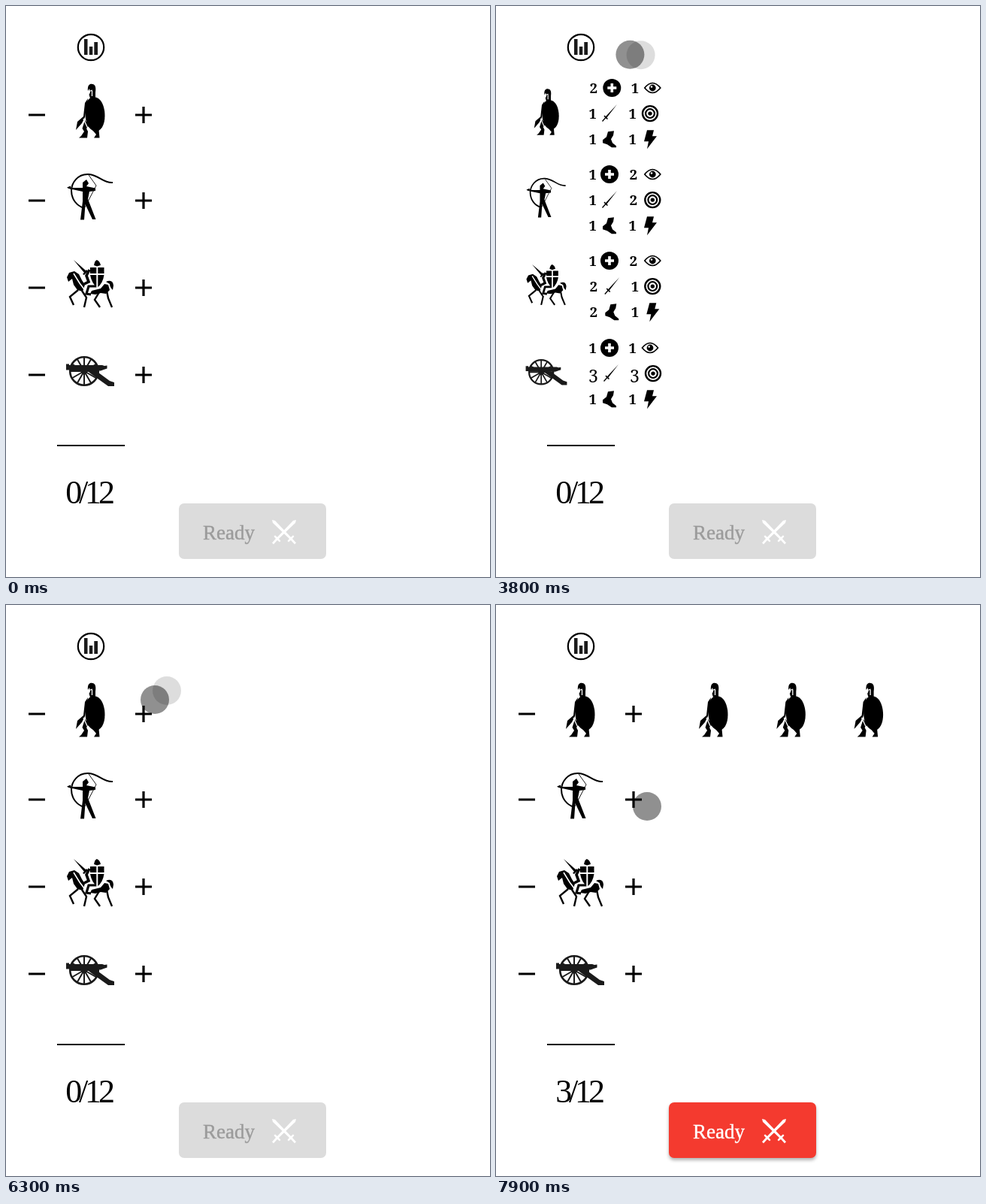
Recreate the animation shown at these times as an HTML page. Size 644x760 px, loop 8000 ms.

```html
<!DOCTYPE html>
<html lang="en">
<head>
<meta charset="utf-8">
<title>Army picker</title>
<style>
  html, body { margin: 0; width: 100%; height: 100%; overflow: hidden; background: #fff; }
  svg { display: block; }
  .line { fill: none; stroke: #000; }
  .gap { fill: none; stroke: #fff; }
  .count { font: 44px "Liberation Serif", serif; letter-spacing: -4.2px; text-anchor: middle; }
  .label { font: 27px "Liberation Serif", serif; stroke-width: .4; }
  .num { font: 600 18.5px "Noto Serif", serif; text-anchor: middle; }
  .num.low { font-size: 23px; font-weight: 500; }
  #button { fill: #dcdcdc; }
</style>
</head>
<body>
<svg width="644" height="760" viewBox="0 0 644 760">
  <defs>
    <g id="soldier" transform="translate(-112 -140)">
      <path d="M109 113C108 105 112 103 115 104C119 104 120 109 119 115L119 123H112L110.500 118L112 115L111 110Z"/>
      <path d="M113 122C125 118 131.500 132 131.500 146C131.500 159 126 167 119 167C110 165 105.500 156 105.500 143C105.500 132 107 125 113 122Z"/>
      <path d="M109 123L105 129L103 147L95 154L93 165L101 156L105 148Z"/>
      <path d="M105 152L101.500 163L104 167L100 173L97 175.500H108L109 167L107 163L111 159ZM114 164L120 171L117 175.500H124.500L123.500 165Z"/>
      <path class="gap" d="M111 113.500L115 112M114.500 113V120M103 150L109 163" stroke-width="1.300"/>
    </g>
    <g id="archer" transform="translate(-112 -254)">
      <path class="line" stroke-width="2" d="M142 235C129 236 124 225 110 224C95 223 87 236 87 246C87 257 94 266 104 269"/>
      <path class="line" stroke-width=".9" d="M110 225L120 239L105 268M82 242L119 244"/>
      <path d="M81 241.500L86 239.500V244Z"/>
      <path d="M102 235L107 231L110 236L107 240L119 242.500L119 246L111 247L109 257L119.500 284H115L105.500 264L104 284.500H99L102 260L102 247L88 244V242L102 242Z"/>
    </g>
    <g id="knight" transform="translate(-112 -370)">
      <path d="M81 361L84 355L91 353L97 357L101 365L105 371L102 380L95 378L90 371L88 363L83 367Z"/>
      <path d="M126 376L131 370L136 371L138 378L133 383L126 382L119 384L112 383L114 379Z"/>
      <path d="M133 367Q142 363 143 372L142 378Q138 374 138 370Z"/>
      <path class="line" stroke-width="2.400" d="M96 378L85 387L90 398M101 379L107 388L104 401M124 381L118 391L125 401M134 379L136 389L141 401"/>
      <path class="line" stroke-width="3.200" d="M121 373L110 373L107 383L113 384"/>
      <path class="line" stroke-width="3.600" d="M111 351L107 359L110 367L104 370"/>
      <path d="M90 338L106 352L104 355ZM102 357L107 351L109 353L104 358Z"/>
      <path d="M117 345Q118 339 121 338Q125 340 126 345L121 346.500Z"/>
      <path d="M112 348H130.500V358Q129 369 121.300 375Q114 369 112 358Z"/>
      <path class="gap" stroke-width="2" d="M121.300 347V376M111 357H132"/>
      <path class="gap" stroke-width="1.600" d="M90 356L98 369L104 377"/>
    </g>
    <g id="cannon" transform="translate(-112 -486)" fill="#1a1a1a">
      <circle class="line" cx="104" cy="486" r="18.800" style="stroke:#1a1a1a" stroke-width="2.600"/>
      <g id="spokes" stroke="#1a1a1a" stroke-width="2"></g>
      <circle cx="104" cy="486" r="4.500"/>
      <path d="M80 476.500H84V478H128L131 479L134.500 478.500V482.500L130 484L126 485.500H84V484.500H80Z"/>
      <path d="M106 484L119 485L138 499L144 501V506H136L115 491Z"/>
    </g>
    <g id="health"><circle r="12"/><path class="gap" stroke-width="3.600" d="M-6 0H6M0-6V6"/></g>
    <g id="eye">
      <path class="line" stroke-width="1.700" d="M-10.500 0Q0-13 10.500 0Q0 13-10.500 0Z"/>
      <circle r="4.400"/><circle cx="-1.300" cy="-1.500" r="1.300" fill="#fff"/>
    </g>
    <path id="sword" d="M10-12L-3.500 5.500L-2 7L-3 8L-5 6.500L-9 11L-10 10L-6 5.500L-7.500 3.500L-6.500 2.500L-5 4Z"/>
    <g id="target"><circle class="line" r="10" stroke-width="2.400"/><circle class="line" r="5.900" stroke-width="2.200"/><circle r="2.700"/></g>
    <path id="foot" d="M-2-10L6-11L5-5L2 0L4 5L9 9V11H3L-3 7L-9 5L-9 1L-4-3Z"/>
    <path id="bolt" d="M-4-12H5L3-4H9L-4 13L-2 3H-8Z"/>
    <path id="blade" d="M-16-16L-12-15L9 7L12 4.500L13.500 6L11 9L16 14.500L14 16.500L9 11L6 13.500L4.500 12L7 9L-15-12Z"/>
  </defs>

  <circle class="line" cx="113" cy="55" r="17.200" stroke-width="2.200"/>
  <path fill="#1a1a1a" d="M104 44h4.500v21H104ZM110.800 54h4.500v11h-4.500ZM117.300 48h4.700v17h-4.700Z"/>
  <g id="picker"></g>
  <g id="stats"></g>
  <path class="line" stroke-width="2" d="M68 585H158"/>
  <text id="count" class="count" x="110" y="662"></text>

  <rect id="button" x="230" y="662" width="196" height="74" rx="7"/>
  <text id="label" class="label" x="262" y="710">Ready</text>
  <g fill="#fff" transform="translate(370 700)"><use href="#blade"/><use href="#blade" transform="scale(-1 1)"/></g>

  <path id="arrow" d="M0 0V27L6 21.500L11 33L16.500 30.500L11.500 20H19Z" stroke="#fff" stroke-width="1.800"/>
  <circle id="ghost" r="19" fill="#d2d2d2" fill-opacity=".75"/>
  <circle id="touch" r="19" fill-opacity=".435"/>
  <circle id="ring" class="line" r="43" stroke-width="3"/>
</svg>
<script>
const $ = id => document.getElementById(id);
const use = (id, x, y, k = 1) => `<use href="#${id}" transform="translate(${x} ${y}) scale(${k})"/>`;
const show = (el, on) => el.style.display = on ? '' : 'none';

const LOOP = 8000;
const OPEN = 1800, CLOSE = 4900;      // stats panel
const ADDS = [6800, 7150, 7450];      // soldiers added
const units = [
  { id: 'soldier', y: 140, mark: 145, row: 109, stats: [2, 1, 1, 1, 1, 1] },
  { id: 'archer', y: 254, mark: 259, row: 224, stats: [1, 2, 1, 2, 1, 1] },
  { id: 'knight', y: 370, mark: 375, row: 339, stats: [1, 2, 2, 1, 2, 1] },
  { id: 'cannon', y: 486, mark: 491, row: 455, stats: [1, 1, 3, 3, 1, 1] }
];
const icons = ['health', 'eye', 'sword', 'target', 'foot', 'bolt'];
const extra = [0, 0, 3.3, 2];         // added width of each digit

const digit = (n, x, y) =>
  `<text class="num${n === 3 ? ' low' : ''}" x="${x + 4.7 + extra[n] * .4}" y="${y + (n === 3 ? 12 : 7)}">${n}</text>`;

function statRow(u, r) {
  const [a, b] = u.stats.slice(r * 2), y = u.row + r * 34.1, w = extra[a];
  return digit(a, 124, y) + use(icons[r * 2], 151 + w, y) +
    digit(b, 177 + w, y) + use(icons[r * 2 + 1], 205 + w + extra[b], y);
}

$('spokes').innerHTML = Array.from({ length: 6 }, (_, i) =>
  `<path d="M85 486H123" transform="rotate(${i * 30} 104 486)"/>`).join('');
$('picker').innerHTML = units.map(u => use(u.id, 112, u.y) +
  `<path class="line" stroke-width="3.200" d="M30 ${u.mark}h22M172 ${u.mark}h22m-11-11v22"/>`).join('') +
  ADDS.map((_, i) => `<g class="added">${use('soldier', 289 + i * 103.3, 140)}</g>`).join('');
$('stats').innerHTML = units.map(u => use(u.id, 67, u.y + 1.3, .857) +
  [0, 1, 2].map(r => statRow(u, r)).join('')).join('');
const added = [...document.querySelectorAll('.added')];

// Keys are [time, x, y]
const arrowPath = [[100, 180, 730], [300, 165, 612], [500, 143, 474], [700, 125, 290], [900, 93, 87], [1200, 108, 66]];
const touchPath = [
  [1800, 107, 67], [2400, 112, 66], [2600, 198, 65], [2800, 198, 65], [3000, 221, 66], [3500, 221, 66],
  [4000, 150, 64], [4200, 150, 64], [4400, 113, 52], [4500, 117, 67], [5100, 117, 67], [5400, 275, 63],
  [5600, 275, 63], [5900, 262, 78], [6400, 182, 138], [6800, 183, 138], [6900, 185, 145], [7500, 185, 145], [7800, 201, 268]
];
// Keys are [start, end, x, y]
const presses = [[1300, 1800, 106.7, 67], [4650, 4900, 117, 66],
  [6750, 6950, 185, 145], [7100, 7250, 185, 145], [7400, 7550, 185, 145]];

function at(path, t) {
  const i = path.findIndex(k => k[0] > t);
  if (i < 1) return i ? path[path.length - 1].slice(1) : path[0].slice(1);
  const [t0, ...p] = path[i - 1], [t1, ...q] = path[i], f = (t - t0) / (t1 - t0);
  return p.map((v, j) => v + (q[j] - v) * f);
}
const place = (el, [x, y]) => el.setAttribute('transform', `translate(${x} ${y})`);

function draw(t) {
  const open = t >= OPEN && t < CLOSE;
  show($('stats'), open);
  show($('picker'), !open);

  const n = ADDS.filter(a => t >= a).length;
  added.forEach((el, i) => show(el, i < n));
  $('count').textContent = n + '/12';

  const f = Math.min(1, Math.max(0, (t - ADDS[0]) / 240));
  const mix = (a, b) => a + (b - a) * f;
  $('button').style.fill = `rgb(${mix(220, 244)},${mix(220, 58)},${mix(220, 47)})`;
  $('button').style.filter = f ? `drop-shadow(0 3px 2px rgba(0,0,0,${.3 * f}))` : 'none';
  $('label').style.fill = $('label').style.stroke = n ? '#fff' : '#9b9b9b';

  show($('arrow'), t >= 100 && t < OPEN);
  place($('arrow'), at(arrowPath, t));

  const pos = at(touchPath, t), trail = at(touchPath, t - 100);
  const moving = pos[0] !== trail[0] || pos[1] !== trail[1];
  show($('touch'), t >= OPEN);
  show($('ghost'), t >= OPEN && moving);
  place($('touch'), pos);
  place($('ghost'), trail);

  const press = presses.find(p => t >= p[0] && t < p[1]);
  show($('ring'), press);
  if (press) place($('ring'), press.slice(2));
}

let start;
function tick(now) {
  start ??= now;
  draw((now - start) % LOOP);
  requestAnimationFrame(tick);
}
draw(0);
requestAnimationFrame(tick);
</script>
</body>
</html>
```
